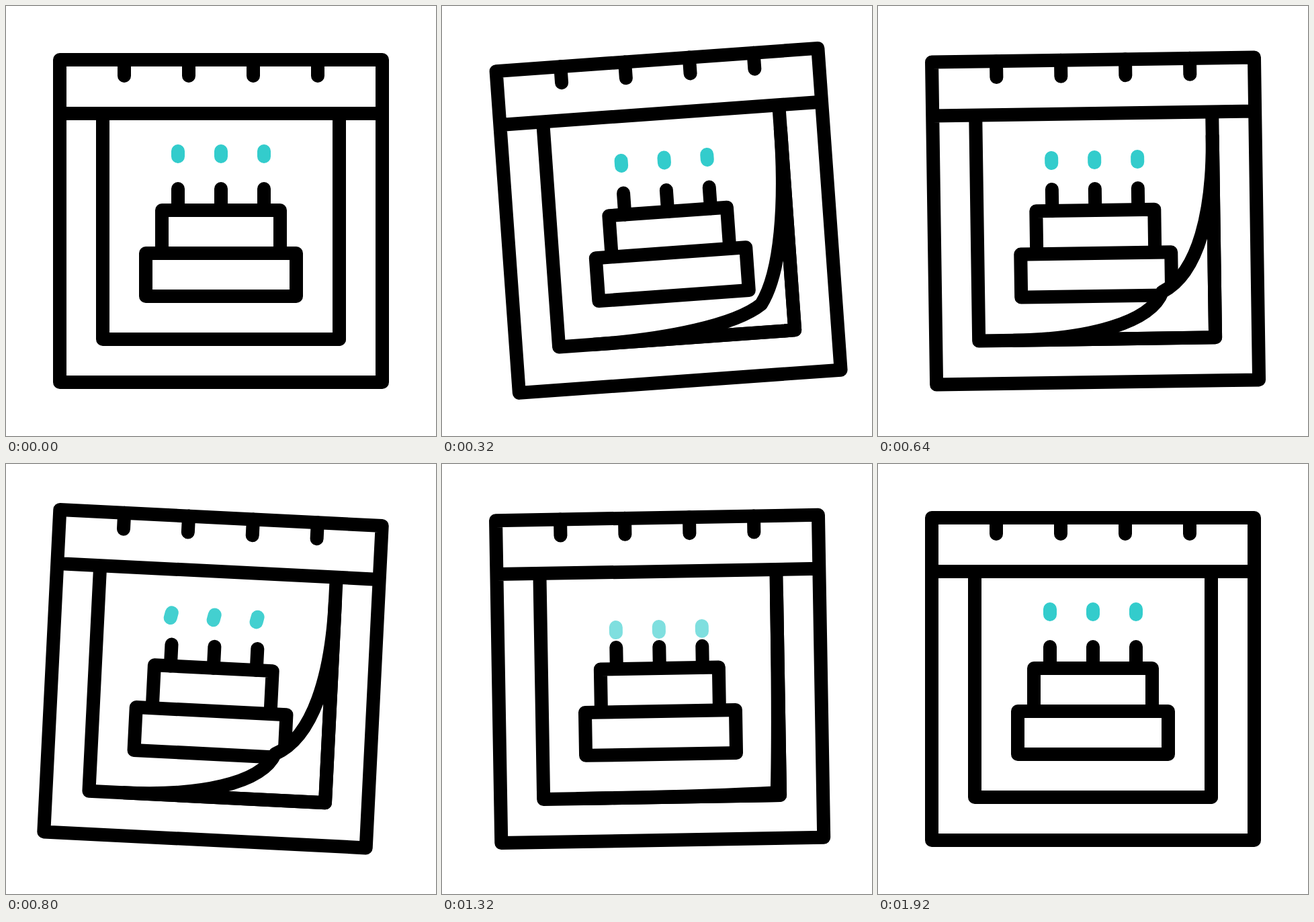
These frames come from a looping animation (640 by 640 pixels, 2 s). An HTML page:

```html
<!DOCTYPE html>
<html lang="en">
<head>
<meta charset="utf-8">
<title>Birthday calendar</title>
<style>
  html, body { margin: 0; width: 100%; height: 100%; overflow: hidden; background: #fff; }
  svg { display: block; width: 100%; height: 100%; }
</style>
</head>
<body>
<svg viewBox="0 0 640 640" fill="none" stroke="#000" stroke-width="20" stroke-linejoin="round">
  <g id="calendar">
    <path id="flames" stroke="#33cccc" stroke-linecap="round"/>
    <g id="top">
      <path d="M256 272V304M320 272V304M384 272V304" stroke-linecap="round"/>
      <path d="M232 362V304H408V362"/>
    </g>
    <path d="M208 368H432V432H208Z"/>
    <path id="curl" fill="#fff"/>
    <path d="M144 160V496H496V160"/>
    <path d="M80 80H560V560H80ZM80 160H560"/>
    <path d="M176 80V104M272 80V104M368 80V104M464 80V104" stroke-linecap="round"/>
  </g>
</svg>
<script>
const LOOP = 2000, STEP = 40;
const $ = id => document.getElementById(id);
const clamp = u => Math.min(1, Math.max(0, u));
const smooth = u => u * u * (3 - 2 * u);

// Eased value through [time, value] keys
function track(t, keys) {
  let [t0, v0] = keys[0];
  for (const [t1, v1] of keys) {
    if (t < t1) return v0 + (v1 - v0) * smooth(clamp((t - t0) / (t1 - t0)));
    t0 = t1;
    v0 = v1;
  }
  return v0;
}

const SWING = [[0, 0], [440, -5], [830, 3], [1280, -1], [1840, 0]];
const DROP = [[0, 0], [200, 5], [440, 0]];
const PEEL = [[0, 0], [560, 1], [840, 1], [1400, 0]];
const SINK = [[0, 220], [440, 229]];
const RISE = [[920, 272], [1720, 220]];

// Page corner: two mirrored curves meeting at the lifted tip
function curlPath(k) {
  const at = (x, y) => `${496 - x} ${496 - y}`;
  const bx = 23 * k, by = 75 + 21 * k;
  const tip = at(78 * k, 69 * k);
  return `M${at(0, 300)}C${at(0, 190)} ${at(bx, by)} ${tip}` +
    `C${at(by, bx)} ${at(190, 0)} ${at(300, 0)}H496Z`;
}

// Flames lean and go out, then new ones rise from the candles
function flamesAt(t, drop) {
  if (t >= 920) {
    return { y: track(t, RISE), tilt: 0, alpha: clamp((t - 920) / 640) };
  }
  return {
    y: track(t, SINK) + drop,
    tilt: 24 * smooth(clamp((t - 640) / 320)),
    alpha: 1 - smooth(clamp((t - 775) / 145))
  };
}

function flamePath({ y, tilt }) {
  const a = tilt * Math.PI / 180, sin = Math.sin(a), cos = Math.cos(a);
  return [256, 320, 384].map(x =>
    `M${x - 10 * sin} ${y - 14 + 10 * cos}L${x - 18 * sin} ${y - 14 + 18 * cos}`).join("");
}

function draw(now) {
  const t = Math.floor(now % LOOP / STEP) * STEP;
  const drop = track(t, DROP), flames = flamesAt(t, drop);
  $("calendar").setAttribute("transform", `rotate(${track(t, SWING)} 320 80)`);
  $("top").setAttribute("transform", `translate(0 ${drop})`);
  $("curl").setAttribute("d", curlPath(track(t, PEEL)));
  $("flames").setAttribute("d", flamePath(flames));
  $("flames").setAttribute("opacity", flames.alpha);
}

const start = performance.now();
function loop() {
  draw(performance.now() - start);
  requestAnimationFrame(loop);
}
loop();
</script>
</body>
</html>
```
